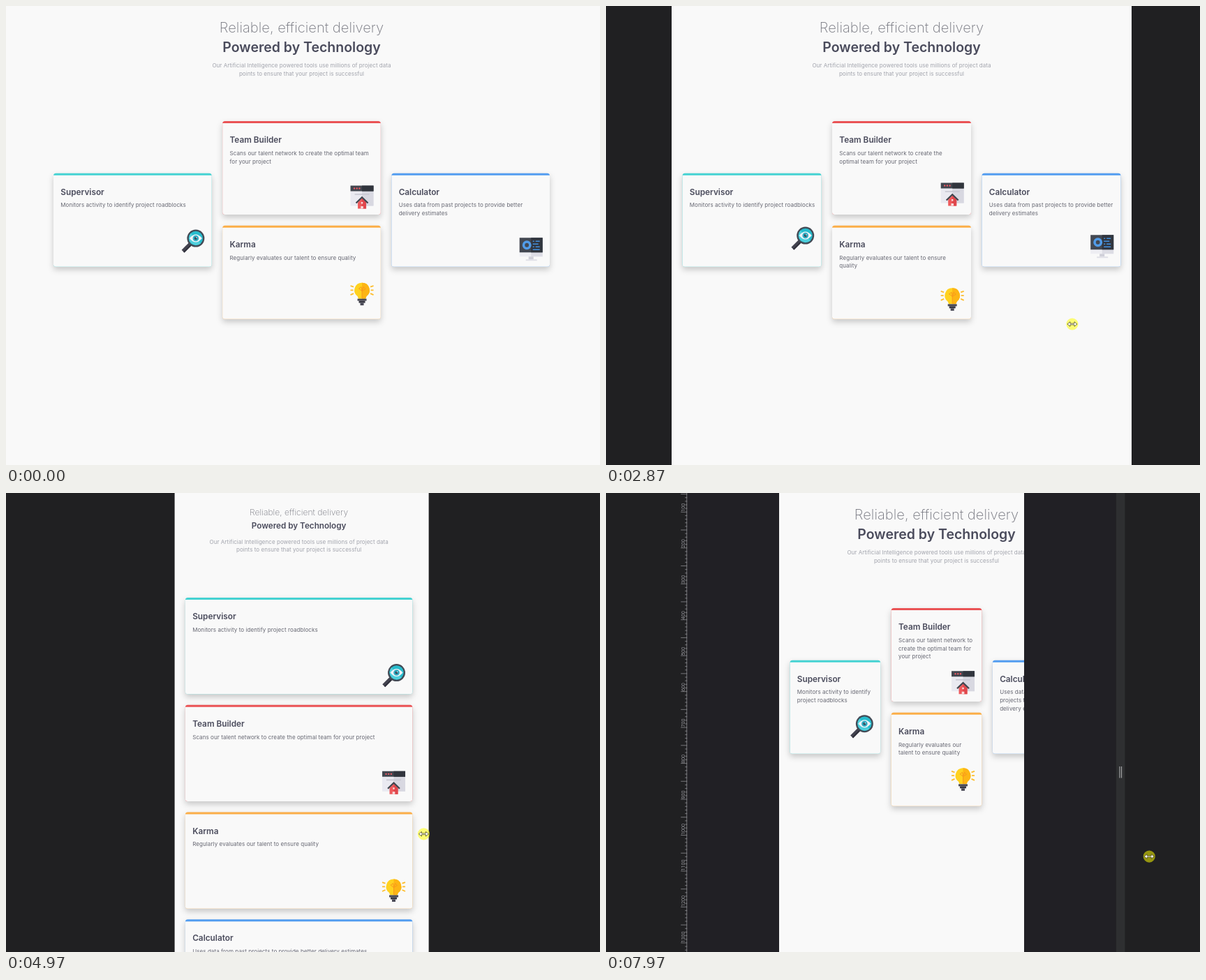
An HTML page that plays this animation: 851 by 658 pixels, repeating every 8 s.

```html
<!DOCTYPE html>
<html lang="en">
<head>
<meta charset="utf-8">
<title>Responsive cards</title>
<style>
  html, body { margin: 0; width: 100%; height: 100%; overflow: hidden; background: #202022; }
  svg { display: block; }
  text { font-family: Inter, "Open Sans", sans-serif; }
  .thin { font-weight: 200; fill: #74757e; }
  .bold { font-weight: 600; fill: #4a4b5c; }
  .sub { font-size: 8px; letter-spacing: .05px; fill: #a2a4ad; }
  .title { font-size: 11.8px; font-weight: 600; fill: #4a4b5c; }
  .desc { font-size: 8px; letter-spacing: .08px; fill: #666772; }
  .card { filter: drop-shadow(0 4px 4px rgba(0, 0, 0, .2)); }
  #ruler text { font: 300 7.2px Roboto, sans-serif; fill: #c4c4cc; }
</style>
</head>
<body>
<svg id="stage" width="851" height="658" viewBox="0 0 851 658">
  <defs>
    <g id="supervisor">
      <path d="M2 31L13 20" stroke="#43434f" stroke-width="5"/>
      <path d="M3.5 32.5L14 22" stroke="#30303b" stroke-width="2"/>
      <circle cx="20.5" cy="12.5" r="12.5" fill="#434a55"/>
      <circle cx="20.5" cy="12.5" r="10.2" fill="#27bccd"/>
      <path d="M13.3 5.3A10.2 10.2 0 0 0 27.7 19.7Z" fill="#4fcfdc"/>
      <path d="M11.5 12.5Q20.5 1.5 29.5 12.5Q20.5 23.5 11.5 12.5Z" fill="#f1f3f8"/>
      <circle cx="20.5" cy="12.5" r="4.3" fill="#31aec5"/>
      <circle cx="20.5" cy="12.5" r="2" fill="#2e4a5c"/>
      <circle cx="21.5" cy="11.5" r=".8" fill="#fff"/>
    </g>
    <g id="team">
      <path d="M0 8H33V29H0Z" fill="#eaeaf1"/>
      <path d="M16.5 8H33V29H16.5Z" fill="#d8d8e1"/>
      <path d="M0 0H33V8H0Z" fill="#42464f"/>
      <path d="M16.5 0H33V8H16.5Z" fill="#31353d"/>
      <path d="M5.5 4h0M9.2 4h0M12.9 4h0" stroke="#ee5a63" stroke-width="2.4" stroke-linecap="round"/>
      <path d="M6 12.5H27" stroke="#c9c9d3" stroke-width="1.6"/>
      <path d="M10.5 24L16.5 18L22.5 24V33H10.5Z" fill="#ee5a5c"/>
      <path d="M16.5 18L22.5 24V33H16.5Z" fill="#e0474c"/>
      <path d="M8 25L16.5 16.7L25 25" fill="none" stroke="#41454e" stroke-width="2.2"/>
      <path d="M15.3 23.5h2.4v2.4h-2.4zM14.7 29.5h3.6V33h-3.6z" fill="#f7dcdc"/>
    </g>
    <g id="karma">
      <path d="M0 5.5L4.5 7M0 11.8H4M0 18.5L4.5 16.5M33 5.5L28.5 7M33 11.8H29M33 18.5L28.5 16.5" stroke="#fdbd2c" stroke-width="1.7"/>
      <path d="M16.5 1A10.7 10.7 0 0 0 10 20.3L11.5 24H21.5L23 20.3A10.7 10.7 0 0 0 16.5 1Z" fill="#ffd21f"/>
      <path d="M16.5 1V24H21.5L23 20.3A10.7 10.7 0 0 0 16.5 1Z" fill="#fdb515"/>
      <path d="M16.5 23V13L12 9.5L15.5 7L16.5 13L18.5 7L21.5 10L16.5 13" fill="none" stroke="#f9981d" stroke-width="1"/>
      <path d="M10 24H23V27H10Z" fill="#4a4a57"/>
      <path d="M12 27H21V30H12Z" fill="#363641"/>
      <path d="M14 30H19V33.5H14Z" fill="#4a4a57"/>
    </g>
    <g id="calculator">
      <path d="M0 21H33V27H0Z" fill="#eeeef3"/>
      <path d="M16.5 21H33V27H16.5Z" fill="#dddde5"/>
      <path d="M13 27H20V31H13Z" fill="#d0d0d9"/>
      <path d="M9 31H25V33H9Z" fill="#e0e0e7"/>
      <path d="M0 0H33V21H0Z" fill="#434852"/>
      <path d="M16.5 0H33V21H16.5Z" fill="#31363f"/>
      <circle cx="10.5" cy="10.5" r="4.7" fill="none" stroke="#519ce9" stroke-width="3.6"/>
      <path d="M19 5H21M23 5H29M19 9H27M19 13H21M23 13H29M19 17H29" stroke="#438fdd" stroke-width="1.6"/>
    </g>
  </defs>
  <rect width="851" height="658" fill="#202022"/>
  <g id="frame">
    <rect id="inner" height="658" fill="#212025"/>
    <g id="bar">
      <rect width="12.7" height="658" fill="#2e2f31"/>
      <path d="M5.2 392V408.500M7.800 392V408.500" stroke="#a9aaac" stroke-width="1.1"/>
    </g>
    <g id="ruler"></g>
  </g>
  <svg id="page" y="0" height="658"></svg>
  <g id="cursor">
    <circle r="8.6" fill="#ffff00" fill-opacity=".53"/>
    <path d="M-7 0L-3-3.300V-.9H3V-3.300L7 0L3 3.300V.9H-3V3.300Z" fill="#fff" stroke="#4c4a1c" stroke-width=".8"/>
  </g>
</svg>
<script>
const LOOP = 8000, CENTER = 423.5, GAP = 15.5, PAD = 10.3, LINE = 11.7;
const $ = id => document.getElementById(id);

// Each break rule: [smallest text width, indexes of words that start a new line]
const cards = [
  { id: 'supervisor', title: 'Supervisor', color: '#45d2d2', col: 0, top: 239.700,
    text: 'Monitors activity to identify project roadblocks',
    breaks: [[178, []], [0, [4]]] },
  { id: 'team', title: 'Team Builder', color: '#ea5355', col: 1, top: 165,
    text: 'Scans our talent network to create the optimal team for your project',
    breaks: [[263, []], [234, [11]], [214, [10]], [202, [9]], [179, [8]], [147, [7]], [0, [5, 10]]] },
  { id: 'karma', title: 'Karma', color: '#fbae48', col: 1, top: 314.800,
    text: 'Regularly evaluates our talent to ensure quality',
    breaks: [[182, []], [154, [6]], [0, [3]]] },
  { id: 'calculator', title: 'Calculator', color: '#539df0', col: 2, top: 239.700,
    text: 'Uses data from past projects to provide better delivery estimates',
    breaks: [[246, []], [210, [9]], [178, [8]], [0, [4, 8]]] }
];

// Painted page width, layout width and pointer position over time
const paintKeys = [[500, 858], [1350, 689], [1400, 675], [2230, 675], [2250, 659], [3380, 659],
  [3860, 440], [4280, 401], [4680, 401], [5480, 300], [5550, 295], [6320, 267], [6740, 267], [7300, 351]];
const layoutKeys = [[500, 858], [1350, 689], [1400, 675], [2230, 675], [2250, 659], [3380, 659],
  [3860, 440], [4280, 393], [4680, 391], [5480, 296], [5550, 290.5], [6320, 267], [6740, 267],
  [7300, 351], [7540, 351], [7541, 451]];
const reopenKeys = [[7540, 351], [7970, 614], [8000, 630]];
const cursorKeys = [[500, 868, 480], [1400, 771, 474], [2250, 711, 462], [2870, 668, 456], [3850, 637, 476],
  [4280, 624, 479], [5550, 577, 497], [6320, 570, 503], [6740, 570, 503], [7510, 684, 513],
  [7970, 778, 521], [8000, 785, 522]];
const rulerTimes = [[500, 2000], [3860, 4600], [5480, LOOP]];

function at(keys, t, k = 1) {
  if (t <= keys[0][0]) return keys[0][k];
  for (let i = 1; i < keys.length; i++) {
    const a = keys[i - 1], b = keys[i];
    if (t < b[0]) return a[k] + (b[k] - a[k]) * (t - a[0]) / (b[0] - a[0]);
  }
  return keys[keys.length - 1][k];
}

function wrap(card, width) {
  const starts = card.breaks.find(rule => width >= rule[0])[1];
  const words = card.text.split(' ');
  return [0, ...starts].map((s, i) => words.slice(s, starts[i]).join(' '));
}

const label = (cls, x, y, text, extra = '') => `<text class="${cls}" x="${x}" y="${y}" ${extra}>${text}</text>`;

function header(width, mobile) {
  const c = width / 2;
  const mid = size => `text-anchor="middle"${size ? ` font-size="${size}"` : ''}`;
  const words = 'Our Artificial Intelligence powered tools use millions of project data points to ensure that your project is successful'.split(' ');
  const split = mobile && width < 288 ? 9 : 10;
  const [y1, y2, y3, y4] = mobile ? [32, 51, 73, 84] : [38, 65.5, 88, 100];
  return label('thin', c, y1, 'Reliable, efficient delivery', mid(mobile ? 12.1 : 20.2))
    + label('bold', c, y2, 'Powered by Technology', mid(mobile ? 11.7 : 19.5))
    + label('sub', c, y3, words.slice(0, split).join(' '), mid())
    + label('sub', c, y4, words.slice(split).join(' '), mid());
}

function drawCard(card, x, y, w, h, lines, iconY) {
  return `<g transform="translate(${x} ${y})">
    <g class="card"><rect width="${w}" height="${h}" rx="3.5" fill="${card.color}"/>
    <path d="M0 3H${w}V${h - 3.5}q0 3.5-3.5 3.5H3.5q-3.5 0-3.5-3.5Z" fill="#f9f9f9"/></g>
    ${label('title', PAD, 31.2, card.title)}
    ${lines.map((s, i) => label('desc', PAD, 48.8 + i * LINE, s)).join('')}
    <use href="#${card.id}" x="${w - PAD - 33}" y="${iconY}"/></g>`;
}

function pageMarkup(width) {
  const mobile = width < 396;
  const box = Math.min(width, 742);
  const w = mobile ? box - 2 * GAP : (box - 4 * GAP) / 3;
  let flow = 150;
  const body = cards.map(card => {
    const lines = wrap(card, w - 2 * PAD);
    const iconY = 48.2 + .144 * w + (lines.length - 1) * LINE;
    const h = mobile ? iconY + 43.2 : 134;
    const x = (width - box) / 2 + GAP + (mobile ? 0 : card.col * (w + GAP));
    const y = mobile ? flow : card.top;
    flow += h + GAP;
    return drawCard(card, x, y, w, h, lines, iconY);
  });
  return '<rect width="900" height="658" fill="#f9f9f9"/>' + header(width, mobile) + body.join('');
}

function buildRuler() {
  let ticks = 'M-.5 0V658', labels = '';
  for (let v = 50; v <= 1320; v += 10) {
    const y = -24.2 + .5147 * v;
    ticks += `M0 ${y}H${v % 50 ? -3 : -9}`;
    if (v % 100 === 0) labels += `<text transform="translate(-3.500 ${y - .5}) rotate(-90)">${v}</text>`;
  }
  $('ruler').innerHTML = `<path d="${ticks}" stroke="#9b9ba1" stroke-width=".7"/>${labels}`;
}

let drawnWidth;
function render(t) {
  const paint = at(paintKeys, t), layout = at(layoutKeys, t);
  const frame = t < 7540 ? layout : at(reopenKeys, t);
  const outer = Math.max(paint, frame);

  $('page').setAttribute('x', CENTER - paint / 2);
  $('page').setAttribute('width', paint);
  if (layout !== drawnWidth) {
    $('page').innerHTML = pageMarkup(layout);
    drawnWidth = layout;
  }

  const shown = rulerTimes.some(([from, to]) => t >= from && t < to);
  $('frame').setAttribute('visibility', shown ? 'visible' : 'hidden');
  $('inner').setAttribute('x', CENTER - frame / 2);
  $('inner').setAttribute('width', frame);
  $('bar').setAttribute('transform', `translate(${CENTER + frame / 2})`);
  $('ruler').setAttribute('transform', `translate(${CENTER - outer / 2})`);

  $('cursor').setAttribute('transform', `translate(${at(cursorKeys, t)} ${at(cursorKeys, t, 2)})`);
}

function tick() {
  render(performance.now() % LOOP);
  requestAnimationFrame(tick);
}

buildRuler();
tick();
</script>
</body>
</html>
```
